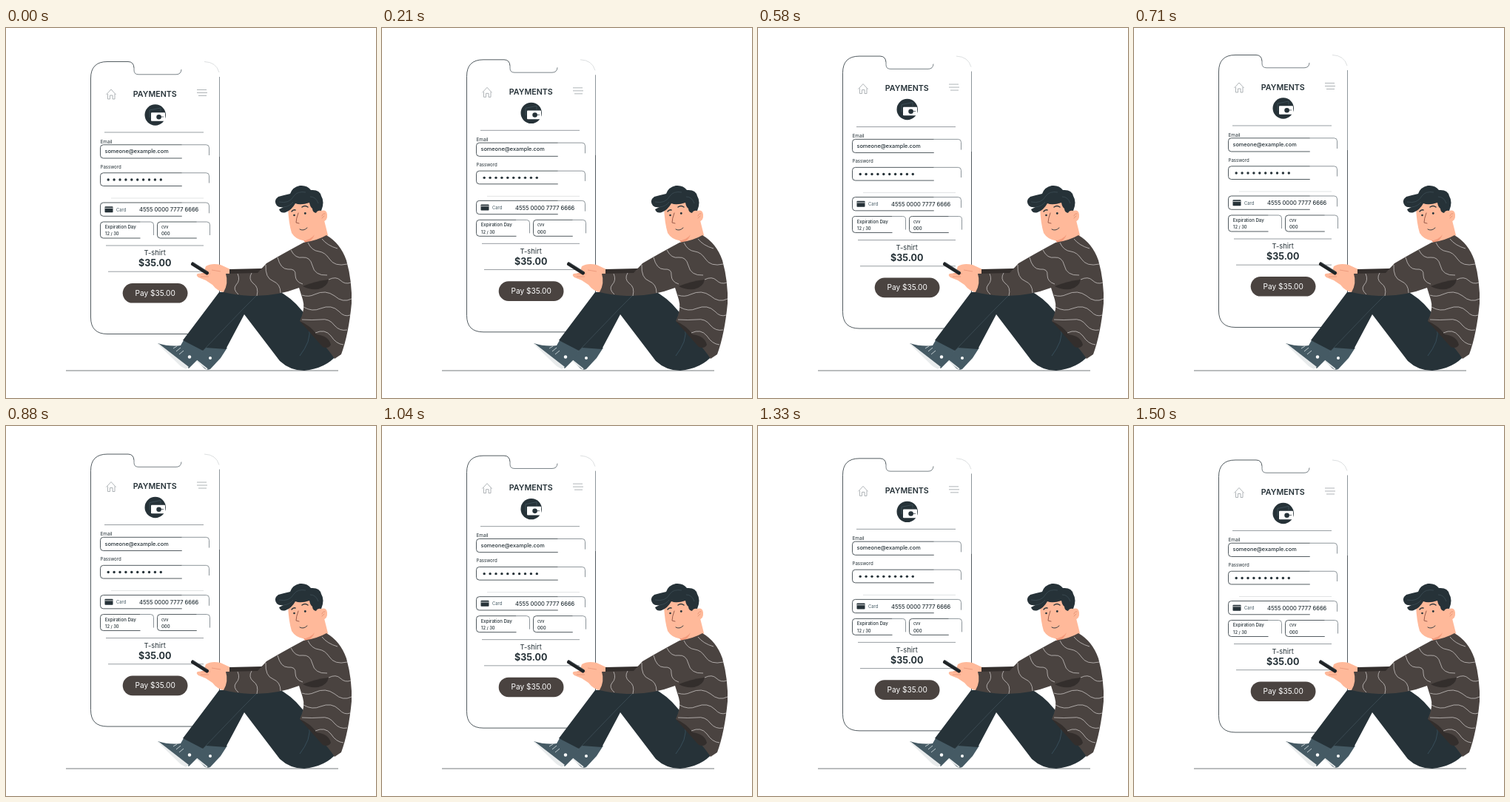
Write an HTML page with a canvas that moves like this. It is 500 px wide and 500 px high and loops after 1.54 s.

```html
<!DOCTYPE html>
<html lang="en">
<head>
<meta charset="utf-8">
<title>Payment</title>
<style>
html, body { margin: 0; width: 100%; height: 100%; overflow: hidden; background: #fff; }
canvas { display: block; width: 500px; height: 500px; }
</style>
</head>
<body>
<canvas id="stage" width="500" height="500"></canvas>
<script>
const ctx = document.getElementById('stage').getContext('2d');
const LOOP = 1540, STEPS = 37;
const INK = '#263238', SLATE = '#455a64', BROWN = '#4a4340', SHADE = '#332e2c';
const SKIN = '#ffb99a', PALE = '#d9d5d3', GREY = '#8d9498';

function fill(d, color) {
  ctx.fillStyle = color;
  ctx.fill(new Path2D(d));
}

function stroke(d, color = INK, width = 1) {
  ctx.strokeStyle = color;
  ctx.lineWidth = width;
  ctx.stroke(new Path2D(d));
}

function dot(x, y, r, color = INK) {
  ctx.fillStyle = color;
  ctx.beginPath();
  ctx.arc(x, y, r, 0, Math.PI * 2);
  ctx.fill();
}

function box(x, y, w, h, r, color) {
  ctx.fillStyle = color;
  ctx.beginPath();
  ctx.roundRect(x, y, w, h, r);
  ctx.fill();
}

function text(str, x, y, size, weight = 400, color = INK, align = 'left') {
  ctx.font = `${weight} ${size}px Inter, sans-serif`;
  ctx.textAlign = align;
  ctx.fillStyle = color;
  ctx.fillText(str, x, y);
}

// Input frame: strong on the left, fading out towards the lower right corner.
function field(x, y, right, bottom) {
  const r = 4, mid = x + (right - x) * 0.75;
  stroke(`M${mid} ${bottom}H${x + r}Q${x} ${bottom} ${x} ${bottom - r}V${y + r}Q${x} ${y} ${x + r} ${y}H${mid}`, INK, 0.8);
  stroke(`M${mid} ${y}H${right - r}Q${right} ${y} ${right} ${y + r}V${bottom - r}`, '#68737a', 0.75);
}

function drawScreen() {
  stroke('M173 54Q172.500 45.500 165 45.500H137Q114.500 45.500 114.500 68V391Q114.500 413.500 137 413.500H266Q288.500 413.500 288.500 391V174', INK, 0.8);
  stroke('M173 54V57Q173 62.800 179 62.800H230Q236.500 62.800 237 56', '#59646a', 0.8);
  stroke('M288.500 174V66', '#68737a', 0.75);
  stroke('M268 45.500Q284 46 288 60', '#c5c9cb', 0.6);

  stroke('M135.500 90L142 83L148.500 90M137.500 89V96H140.500V91H144V96H147V89', GREY, 0.7);
  stroke('M258 83.500H271M258 87.500H272M260 91.500H271', GREY, 0.7);
  text('PAYMENTS', 201.3, 92.8, 10.7, 600, INK, 'center');

  dot(201.7, 117.5, 14.2);
  stroke('M194 121V111L209 108V113', SLATE, 0.7);
  box(196, 114.2, 19, 11.6, 1, '#fff');
  dot(206.6, 120.2, 3.3);
  stroke('M206 120H213', INK, 0.7);

  stroke('M133 141H267', GREY, 0.9);
  text('Email', 127.5, 155.8, 6.4);
  field(127.5, 157.8, 274.5, 176);
  text('someone@example.com', 133.5, 169, 7.3, 500);
  text('Password', 127.5, 189.6, 6.1);
  field(127.5, 195.8, 274.5, 213.5);
  for (let i = 0; i < 10; i++) dot(138.2 + i * 7.9, 205, 1.7);
  stroke('M142 230H267', '#d4d7d8', 0.7);

  field(127.5, 236, 274.5, 254.3);
  box(133.5, 241.2, 11, 8, 0.8, INK);
  stroke('M133.500 243.400H144.500', '#fff', 0.8);
  text('Card', 149, 247.8, 5.9, 400, SLATE);
  text('4555 0000 7777 6666', 180, 248.3, 7.5, 500);

  field(127.5, 262, 199.5, 284);
  text('Expiration Day', 133.7, 271, 6.1, 500);
  text('12 / 30', 134, 280.3, 5.8, 500);
  field(204.5, 262, 275.5, 284);
  text('cvv', 210, 271, 5.5, 500);
  text('000', 210, 280.3, 6, 500);

  stroke('M135 294H267', GREY, 0.9);
  text('T-shirt', 201.2, 307.5, 9.4, 400, INK, 'center');
  text('$35.00', 201.2, 322.2, 12.5, 700, INK, 'center');
  stroke('M138 329.200H267', GREY, 0.9);

  box(157.7, 345, 87.8, 26.6, 13.3, BROWN);
  text('Pay $35.00', 201.7, 361.6, 10.1, 400, '#fff', 'center');
}

function drawShoes() {
  fill('M257 448L268 432H299L290 446L276 461Q272 463 268 460Z', SLATE);
  stroke('M257 449L272 461', '#e8ebec', 1.8);
  dot(276, 446, 2, '#fff');
  fill('M205 426Q221 431 236 429L240 422L267 433L260 447L247 460Z', SLATE);
  fill('M204 426L207 427L247 458L243 461L236 457Z', '#e8ebec');
  stroke('M226 433L231 430M230 437L236 432M234 441L240 436', '#cfd8dc', 0.9);
  dot(248, 444.5, 2.2, '#fff');
}

function drawLegs() {
  fill('M239 422L288 357L364 353Q386 364 400 382L447 442Q432 460 403 463Q384 463 370 450L322 387L297 434L270 432L266 436Z', INK);
  stroke('M270 432L320 380L340 360', '#43545c', 0.7);
  stroke('M400 387Q415 403 408 424Q404 434 397 443', '#3c5562', 0.8);
}

function drawHand() {
  fill('M267 331L270 322Q278 317 290 320L303 326V357L294 357Q285 355 279 347L270 341L260 337Q256 334 259 332Z', SKIN);
  stroke('M264 332L276 332M263 336L274 336M278 327L290 329', '#e79476', 0.8);
  ctx.lineCap = 'round';
  stroke('M252.500 319L271.500 331', '#1f2326', 5);
  ctx.lineCap = 'butt';
  stroke('M253 317L272 329', '#58636a', 0.7);
}

function drawHead() {
  fill('M408 276L429 256L435 280Q427 289 405 292Z', SKIN);
  fill('M381 243Q382 264 386 277Q391 285 401 287Q413 288 419 276L427 262Q435 261 434 252Q433 245 426 247L420 232L393 230Z', SKIN);
  fill('M402 287Q412 286 417 279Q414 288 405 291Z', '#f49b7c');
  fill('M366 240Q361 233 368 228Q375 226 384 224Q387 215 397 213Q407 212 412 219Q424 218 426 227Q431 235 426 247Q421 246 419 250Q414 249 414 244Q411 242 410 236Q398 240 391 237Q386 246 378 249Q371 251 369 245L375 242Q369 243 366 240Z', INK);
  stroke('M369 235Q383 238 389 227Q394 220 405 222M411 228Q419 228 422 237M375 242Q384 241 388 235', '#405159', 0.7);
  ctx.lineCap = 'round';
  stroke('M386 248Q388 245 391 246M400 242Q404 239 408 242', INK, 1.4);
  stroke('M395 250Q392 258 392 263L396 264', '#8f5142', 0.9);
  stroke('M397 272Q402 275 407 270', INK, 0.9);
  stroke('M427 254Q428 250 431 251M427 257L430 254', '#df8d70', 0.8);
  ctx.lineCap = 'butt';
  dot(389.5, 253, 1.3);
  dot(404.3, 250.5, 1.4);
}

function drawSweater() {
  fill('M302 326L345 325L370 314L360 336L302 333Z', SHADE);
  fill('M402 290Q421 287 433 280Q452 291 460 314Q468 343 467 372Q463 414 453 441L444 447Q429 424 397 396Q405 379 401 367L396 351Q365 363 330 362Q310 361 294 357Q301 345 297 332L340 331L352 318Q374 305 402 290Z', BROWN);
  fill('M401 349Q418 342 436 340Q434 350 422 353Q409 354 401 349Z', SHADE);
  fill('M397 396Q411 402 420 414Q436 416 439 428Q436 434 428 431Z', SHADE);

  [
    'M313 332Q317 341 311 347Q306 353 314 360',
    'M332 331Q327 339 334 345Q342 350 339 362',
    'M351 320Q350 338 361 342Q371 346 371 358',
    'M367 310Q371 326 381 326Q392 325 391 334Q391 343 401 346',
    'M385 300Q391 312 401 310Q411 309 414 321Q417 335 434 334',
    'M408 290Q413 301 423 302Q431 303 437 312Q444 323 461 319',
    'M427 285Q434 294 448 298',
    'M436 340Q446 335 452 341Q458 347 466 344',
    'M400 361Q409 364 417 360Q432 353 444 362Q455 372 467 366',
    'M402 377Q414 384 425 379Q440 373 450 383Q457 391 465 388',
    'M400 394Q414 395 425 394Q437 392 444 402Q451 410 461 408',
    'M418 412Q431 406 439 416Q446 427 456 428'
  ].forEach(d => stroke(d, PALE, 0.7));
}

function drawPerson() {
  stroke('M81 463H449', '#a3a7a9', 1.3);
  drawShoes();
  drawLegs();
  drawHand();
  drawHead();
  drawSweater();
}

// The screen bobs at constant speed, turning at 730 ms and 1500 ms.
function screenOffset(ms) {
  const fromTop = Math.abs(ms - 730) / 770;
  return -9.3 + 9.8 * (fromTop > 1 ? 2 - fromTop : fromTop);
}

function render(now) {
  const step = Math.floor(((now % LOOP) + 3) * STEPS / LOOP) % STEPS;
  ctx.fillStyle = '#fff';
  ctx.fillRect(0, 0, 500, 500);
  ctx.save();
  ctx.translate(0, screenOffset(step * LOOP / STEPS));
  drawScreen();
  ctx.restore();
  drawPerson();
}

const start = performance.now();
function tick() {
  render(performance.now() - start);
  requestAnimationFrame(tick);
}
tick();
</script>
</body>
</html>
```
